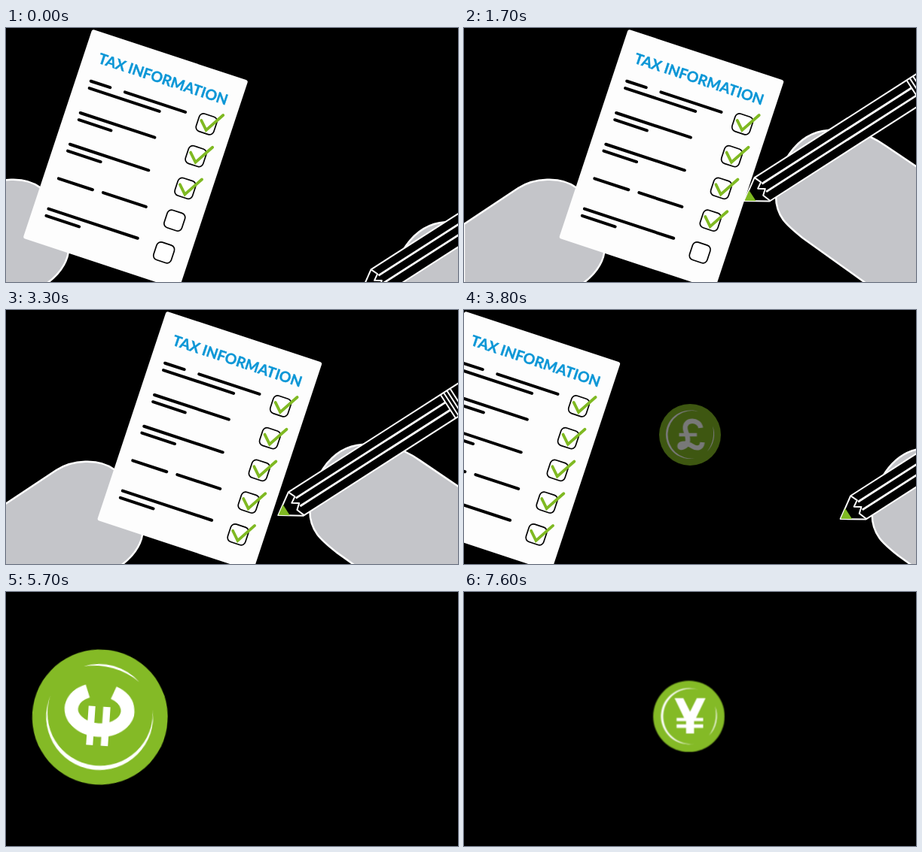
An HTML page that plays this animation: 600 by 338 pixels, repeating every 7700 ms.

```html
<!DOCTYPE html>
<html lang="en">
<head>
<meta charset="utf-8">
<title>Tax information</title>
<style>
  html, body { margin: 0; width: 100%; height: 100%; overflow: hidden; background: #000; }
  svg { display: block; width: 600px; height: 338px; }
  .hand { fill: #c4c5c9; stroke: #fff; stroke-width: 2.5; stroke-linejoin: round; }
  .title { font: 700 19.4px Lato, "Open Sans", sans-serif; fill: #0b96d6; stroke: #0b96d6; stroke-width: .4; text-anchor: middle; }
  .rule { stroke: #000; stroke-width: 4; stroke-linecap: round; }
  .box { fill: #fff; stroke: #000; stroke-width: 1.7; }
  .tick { fill: none; stroke: #7fb922; stroke-width: 3.8; stroke-linecap: round; stroke-dasharray: 1 2; }
  .wood { fill: #000; stroke: #fff; stroke-width: 2; stroke-linejoin: round; }
  .grain { fill: none; stroke: #fff; stroke-width: 2.8; }
  .white { fill: #fff; }
  .line { fill: none; stroke: #fff; }
</style>
</head>
<body>
<svg viewBox="0 0 600 338">
  <g id="sheet">
    <path class="hand" d="M0 261L72 213C92 200 128 196 150 213C168 226 187 262 187 292C186 314 172 332 147 347L0 440Z"/>
    <g transform="translate(218 1.5) rotate(18.3)">
      <rect width="218" height="293" rx="3" fill="#fdfdfd"/>
      <text class="title" x="110.3" y="40.3">TAX INFORMATION</text>
      <g id="form" transform="translate(0 .8)"/>
    </g>
  </g>

  <g id="writer">
    <path class="hand" d="M428 90L188 -73C158 -94 138 -95 112 -94C67 -91 42 -43 42 -6C42 21 57 33 77 49L428 301Z"/>
    <g transform="rotate(-32.7)">
      <path class="wood" d="M0 0L28 -18.6H300Q306 -18.6 306 -12.6V12.6Q306 18.6 300 18.6H28Z"/>
      <path d="M.5 0L13 -8.4V8.4Z" fill="#7fb922"/>
      <path class="line" stroke-width="2" stroke-linejoin="round" d="M28 -18.6L32 -9L24 -4L32 1.5L25 7.5L29 18.6"/>
      <path class="grain" d="M32 -6.5H268M31 5.5H268"/>
      <path class="line" stroke-width="2" d="M268 -18V18M273 -18V18M278 -18V18M283 -18V18"/>
    </g>
  </g>

  <g id="coin">
    <circle r="90" fill="#84ba26"/>
    <path class="white" d="M24 -67.5A71 71 0 1 0 15 69A69.9 69.9 0 1 1 24 -67.5Z"/>
    <path class="white" d="M66 -26A71 71 0 0 1 50 49A94 94 0 0 0 66 -26Z"/>
    <g id="pound">
      <path class="line" stroke-width="14" d="M31 -20C28 -46 -16 -48 -14 -18C-13 -6 -2 8 -8 24C-12 36 -30 42 -30 33C-30 22 -6 24 6 33C20 42 34 40 36 22"/>
      <path class="line" stroke-width="10" d="M-32 0H20"/>
    </g>
    <g id="euro">
      <path class="line" stroke-width="18" d="M33.5 -18.5A27 37.5 0 1 0 33.5 16"/>
      <path class="white" d="M-38 -16H14V-7H-38ZM-38 3.5H14V13H-38Z"/>
    </g>
    <path id="yen" class="white" d="M-36 -46H-14L3 -12L20 -46H42L18 4H36V12H13V20H36V29H13V43H-7V29H-31V20H-7V12H-31V4H-12Z"/>
  </g>
</svg>

<script>
const LOOP = 7700;
const $ = id => document.getElementById(id);
const SMOOTH = 'cubic-bezier(.37,0,.63,1)';
const OUT = 'cubic-bezier(.2,.6,.4,1)';
const IN = 'cubic-bezier(.5,0,.8,.6)';

function add(parent, name, attrs) {
  const el = document.createElementNS('http://www.w3.org/2000/svg', name);
  for (const key in attrs) el.setAttribute(key, attrs[key]);
  return parent.appendChild(el);
}

// steps: [ms, value, easing towards the next step]
function play(el, prop, steps) {
  const all = [...steps];
  if (all[0][0] > 0) all.unshift([0, all[0][1]]);
  if (all.at(-1)[0] < LOOP) all.push([LOOP, all.at(-1)[1]]);
  const frames = all.map(([ms, value, easing = 'linear']) => ({ offset: ms / LOOP, [prop]: value, easing }));
  el.animate(frames, { duration: LOOP, iterations: Infinity });
}

const px = (x, y) => `${x}px ${y}px`;

// Printed rules: y, start, end
[
  [65.5, 20, 47], [65.2, 67.5, 152], [75, 21, 119],
  [110, 20, 124], [119.4, 21, 66],
  [154, 20, 130], [163.3, 20, 66],
  [202, 20, 67.5], [201.3, 82, 142],
  [244.5, 20, 144.5], [254.2, 20, 66]
].forEach(([y, a, b]) => add($('form'), 'path', { class: 'rule', d: `M${a} ${y}H${b}` }));

const ticks = [0, 1, 2, 3, 4].map(i => {
  const row = add($('form'), 'g', { transform: `translate(183.7 ${71.6 + 45 * i})` });
  add(row, 'rect', { class: 'box', x: -12.3, y: -12.3, width: 24.6, height: 24.6, rx: 6 });
  return add(row, 'path', { class: 'tick', pathLength: 1, d: 'M-8.2 -2.6L2 7.8L17.2 -18.2' });
});

function drawTick(el, start, turn, end) {
  play(el, 'strokeDashoffset', [[0, 1.2], [start, 1.2, 'steps(1)'], [start + 1, 1], [turn, .67], [end, 0]]);
}
drawTick(ticks[3], 1100, 1260, 1500);
drawTick(ticks[4], 2450, 2600, 2850);

play($('sheet'), 'translate', [
  [0, px(-104, 0), OUT], [600, px(0, 0)], [3200, px(0, 0), IN],
  [3800, px(-216, 0)], [4000, px(-430, 0)]
]);

play($('writer'), 'translate', [
  [0, px(471.5, 352.5), OUT], [800, px(345, 256), SMOOTH],
  [1100, px(322, 250)], [1260, px(328.5, 263)], [1500, px(351, 243)],
  [1700, px(372, 230), OUT], [1900, px(376, 228), SMOOTH],
  [2450, px(307, 293)], [2600, px(313.5, 305)], [2850, px(337, 286), OUT],
  [3050, px(358, 273)], [3200, px(358, 273), IN],
  [3800, px(499, 278)], [4000, px(640, 283)]
]);

const coin = $('coin');
play(coin, 'translate', [
  [0, px(300, 166)], [3900, px(300, 166)], [4400, px(300, 164.5)],
  [4600, px(300, 164.5), SMOOTH], [5870, px(117, 166.5)],
  [5900, px(117, 166.5), SMOOTH], [7060, px(300, 164.5)],
  [7300, px(298.5, 164.5)], [7600, px(298.5, 165.5)]
]);
play(coin, 'rotate', [
  [4600, '0deg', SMOOTH], [5870, '-90deg'], [5900, '-90deg', SMOOTH], [7060, '0deg']
]);
play(coin, 'scale', [
  [3660, 0], [3800, .45, OUT], [4150, 1.085, SMOOTH], [4400, 1],
  [7060, 1, SMOOTH], [7330, 1.13, 'cubic-bezier(.33,0,.67,.33)'], [LOOP, 0]
]);
play(coin, 'opacity', [[3660, 0], [3800, .47], [4000, 1]]);

function show(id, from, to) {
  play($(id), 'opacity', [
    [0, 0], [from, 0], [from + 100, 1], [to, 1], [Math.min(to + 100, LOOP), to < LOOP ? 0 : 1]
  ]);
}
show('pound', 3500, 4200);
show('euro', 4200, 5850);
show('yen', 5850, LOOP);
</script>
</body>
</html>
```
